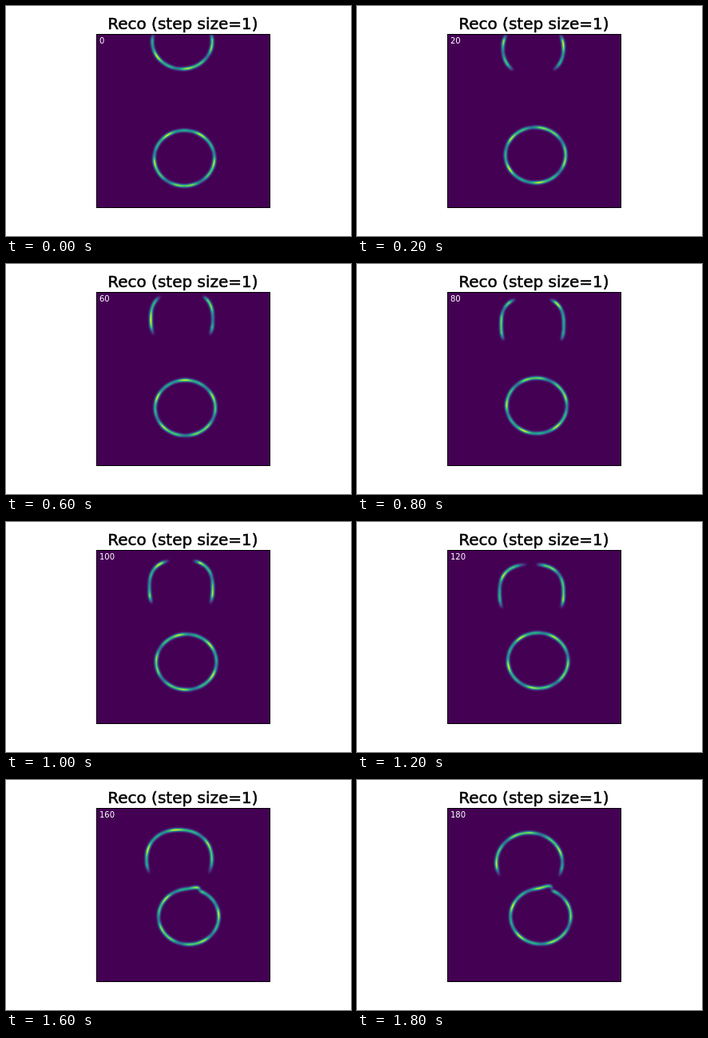
An HTML page with a canvas for the animation above (2 s loop, 432 by 288 pixels).

```html
<!DOCTYPE html>
<html lang="en">
<head>
<meta charset="utf-8">
<title>Reco</title>
<style>
  html, body { margin: 0; width: 100%; height: 100%; overflow: hidden; background: #fff; }
  canvas, svg { position: absolute; left: 0; top: 0; }
  canvas { left: 113px; top: 35px; }
  text { font-family: "DejaVu Sans", sans-serif; }
</style>
</head>
<body>
<canvas width="218" height="218"></canvas>
<svg width="432" height="288">
  <text x="221.4" y="29" font-size="20" text-anchor="middle" stroke="#000" stroke-width=".5">Reco (step size=1)</text>
  <rect x="113.5" y="35.5" width="217" height="217" fill="none" stroke="#000"/>
  <text id="count" x="117" y="47" font-size="10" fill="#fff">0</text>
</svg>
<script>
const SIZE = 218, LEFT = 113, TOP = 35, STEP = 200, STEPS = 10;
const SIGMA = 1.4, REACH = 5;
const ctx = document.querySelector('canvas').getContext('2d');
const image = ctx.createImageData(SIZE, SIZE);
const field = new Float32Array(SIZE * SIZE);
const count = document.getElementById('count');

const viridis = ['440154', '482878', '3e4989', '31688e', '26828e', '1f9e89', '35b779', '6ece58', 'b5de2b', 'fde725']
  .map(hex => [0, 2, 4].map(k => parseInt(hex.slice(k, k + 2), 16)));

const bell = x => Math.exp(-x * x);
const clamp = x => Math.max(0, Math.min(1, x));
const signedPow = (x, q) => Math.sign(x) * Math.abs(x) ** q;
const glow = (a, step) => .7 + .17 * Math.sin(5 * a + step) + .1 * Math.sin(11 * a - 2 * step);

// Adds a soft dot to the field; overlapping dots keep the higher value.
function stamp(x, y, level) {
  x -= LEFT + .5;
  y -= TOP + .5;
  const x0 = Math.max(0, Math.ceil(x - REACH)), x1 = Math.min(SIZE - 1, x + REACH);
  const y0 = Math.max(0, Math.ceil(y - REACH)), y1 = Math.min(SIZE - 1, y + REACH);
  for (let py = y0; py <= y1; py++) {
    for (let px = x0; px <= x1; px++) {
      const v = level * Math.exp(-((px - x) ** 2 + (py - y) ** 2) / (2 * SIGMA * SIGMA));
      const k = py * SIZE + px;
      if (v > field[k]) field[k] = v;
    }
  }
}

// Sinking ring, open at the bottom, whose top gap closes; a bit square midway.
function drawUpperRing(step) {
  const cx = 220.7 - .06 * step * step, cy = 44.5 + 9 * step - .27 * step * step;
  const rx = 37.5 + .42 * step, ry = 34.3 + .04 * step * step;
  const q = 1 - .25 * Math.sin(Math.PI * step / 9);
  const topGap = 78 * (1 - step / 7), bottomEdge = 112 + 80 * Math.exp(-1.2 * step);
  for (let deg = -180; deg < 180; deg += .25) {
    const a = deg * Math.PI / 180, fromTop = Math.abs(deg);
    const fade = clamp((fromTop - topGap + 6) / 14) * clamp((bottomEdge + 4 - fromTop) / 16);
    if (!fade) continue;
    stamp(cx + rx * signedPow(Math.sin(a), q), cy - ry * signedPow(Math.cos(a), q), fade * glow(a, step));
  }
}

// Rising ring; its top bulges and tears where the rings meet.
function drawLowerRing(step) {
  const cx = 223.3 + .2 * step + .06 * step * step;
  const cy = 190.5 - 4.1 * step + .21 * step * step;
  const kick = Math.max(0, step - 6) * 1.5;
  for (let deg = 0; deg < 360; deg += .75) {
    const a = deg * Math.PI / 180;
    const bump = kick * bell((deg - 287) / (deg < 287 ? 13 : 4));
    const level = glow(a, step) * (1 - kick / 6 * bell((deg - 291) / 4));
    stamp(cx + (37.7 + bump) * Math.cos(a), cy + (34.7 + bump) * Math.sin(a), level);
  }
}

function paint() {
  field.forEach((v, k) => {
    const p = clamp(v) * 9, s = Math.min(8, Math.floor(p));
    const colour = viridis[s].map((c, n) => c + (viridis[s + 1][n] - c) * (p - s));
    image.data.set([...colour, 255], k * 4);
  });
  ctx.putImageData(image, 0, 0);
}

let shown = -1;
function frame() {
  const step = Math.floor(performance.now() / STEP) % STEPS;
  if (step !== shown) {
    shown = step;
    field.fill(0);
    drawUpperRing(step);
    drawLowerRing(step);
    paint();
    count.textContent = step * 20;
  }
  requestAnimationFrame(frame);
}
frame();
</script>
</body>
</html>
```
